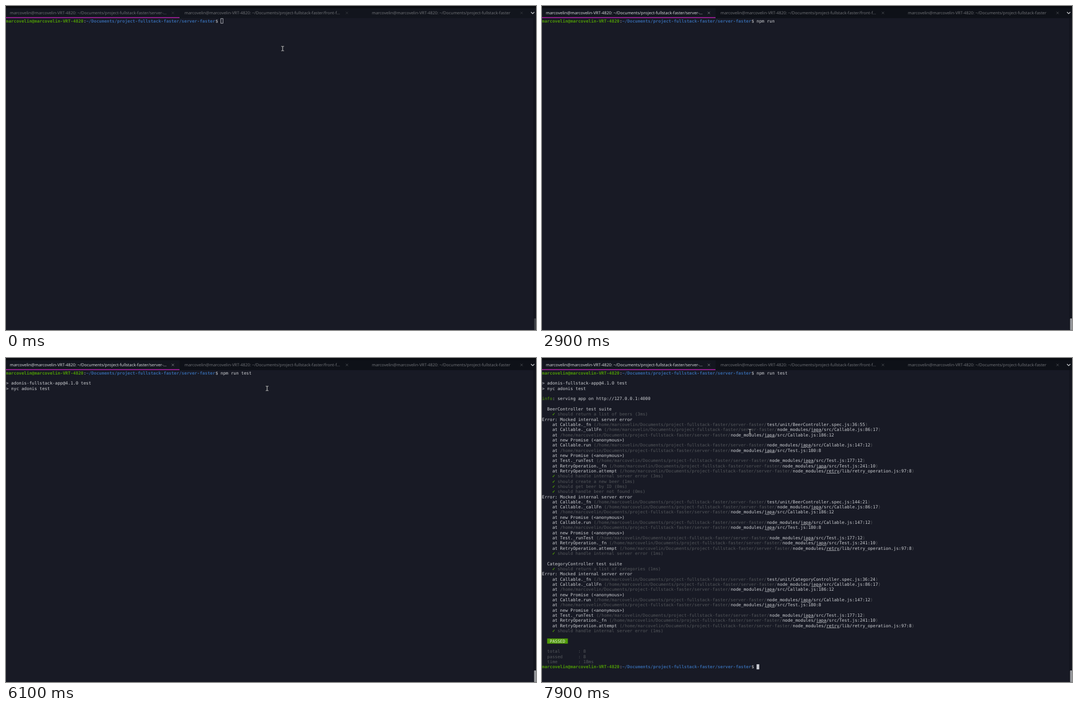
An HTML page for the animation above (8 s loop, 956 px wide and 586 px high).

```html
<!DOCTYPE html>
<html lang="en">
<head>
<meta charset="utf-8">
<title>Terminal test run</title>
<style>
  html, body { margin: 0; width: 100%; height: 100%; overflow: hidden; background: #181a25; }
  svg { display: block; width: 956px; height: 586px; }
  text { white-space: pre; text-rendering: geometricPrecision; }
  #term text { font: 7.745px "DejaVu Sans Mono", monospace; fill: #cdcfd3; }
  #term .dim { fill: #55585c; }
  #term .ok { fill: #4e9a06; }
  #term .mark { fill: #4e9a06; stroke: #4e9a06; stroke-width: .35; }
  #term .user { fill: #4e9a06; font-weight: bold; }
  #term .path { fill: #3465a4; font-weight: bold; }
  #term .link { text-decoration: underline; }
  #term .badge { fill: #e4e6e0; }
  #bar { fill: #12151d; }
  #tabs text { font: 7.43px "Noto Sans", "Open Sans", sans-serif; fill: #6d6f74; }
  #tabs path { fill: none; stroke: #3c3f45; stroke-width: .8; }
  #tabs .chevron { stroke: #d0d2d6; stroke-width: 1.2; }
  #thumb { fill: #3f4248; }
  .focus #bar { fill: #0e1118; }
  .focus #tabs text.active { fill: #d6d8db; }
  .focus #tabs .cross { stroke: #55585e; }
  .focus #tabs .cross.active { stroke: #8b8d92; }
  .focus #thumb { fill: #97999d; }
  #cursor { fill: none; stroke: #c6c8cf; stroke-width: .8; }
  .focus #cursor { fill: #c6c8cf; stroke: none; }
  #pointer { fill: none; }
  #pointer .edge { stroke: #0b0c10; stroke-width: 2.2; }
  #pointer .beam { stroke: #e2e3e6; }
</style>
</head>
<body>
<svg id="stage" viewBox="0 0 956 586">
  <rect width="956" height="586" fill="#181a25"/>
  <rect id="bar" width="956" height="22"/>
  <rect y="4" width="313" height="18" fill="#13161f"/>
  <rect width="956" height="4" fill="#0a0c11"/>
  <rect y="20" width="313" height="2" fill="#8c1d88"/>
  <rect x="951" y="22" width="5" height="564" fill="#13151e"/>
  <rect id="thumb" x="952.5" y="565" width="3.5" height="21" rx="1"/>
  <g id="tabs"><path class="chevron" d="M947 11l3 3l3-3"/></g>
  <g id="term">
    <g id="base"></g>
    <g id="intro"></g>
    <g id="report"></g>
    <g id="done"></g>
    <rect id="cursor"/>
  </g>
  <g id="pointer">
    <path id="beam" class="edge" d="M-2.4-4H-.8L0-3.4L.8-4H2.4M0-3.4V3.4M-2.4 4H-.8L0 3.4L.8 4H2.4"/>
  </g>
</svg>
<script>
const LOOP = 8000, STEP = 100, CW = 4.663, RH = 9.325, TOP = 22.4;
const USER = 'marcovelin', HOST = USER + '-VRT-4820';
const PROJECT = '/Documents/project-fullstack-faster';
const ROOT = '/home/' + USER + PROJECT + '/server-faster/';
const PROMPT_COLS = 83, LAST_ROW = 57;
const FOCUS = 300, ENTER = 5200, INTRO = 5600, REPORT = 7100, DONE = 7400;
const $ = id => document.getElementById(id);

function add(parent, tag, attrs, text) {
  const el = document.createElementNS('http://www.w3.org/2000/svg', tag);
  for (const k in attrs) el.setAttribute(k, attrs[k]);
  if (text !== undefined) el.textContent = text;
  return parent.appendChild(el);
}

// Each run is a string, or [string, class].
function line(parent, row, col, ...runs) {
  let el;
  for (const run of runs) {
    const [text, cls = ''] = [].concat(run);
    el = add(parent, 'text', { x: col * CW, y: TOP + row * RH + 7.3, class: cls }, text);
    col += text.length;
  }
  return el;
}

function prompt(parent, row) {
  line(parent, row, 0, [USER + '@' + HOST, 'user'], ':',
    ['~' + PROJECT + '/server-faster', 'path'], '$');
}

// The report is written top to bottom; row is the next free line.
const report = $('report');
let row = 5;
const write = (col, ...runs) => line(report, row++, col, ...runs);

function check(text) {
  line(report, row, 4, ['✓', 'mark']);
  write(6, [text, 'dim']);
}

function failure(spec) {
  const lib = (name, file) => ['node_modules/', [name, 'link'], file];
  const japa = file => lib('japa', '/src/' + file);
  const call = (fn, where) => write(4, 'at ' + fn + ' ', ['(' + ROOT, 'dim'], ...where, [')', 'dim']);
  const bare = where => {
    write(4, 'at ', [ROOT, 'dim'], ...where);
    write(4, 'at new Promise (<anonymous>)');
  };

  write(0, 'Error: Mocked internal server error');
  call('Callable._fn', ['test/unit/' + spec]);
  call('Callable._callFn', japa('Callable.js:86:17'));
  bare(japa('Callable.js:186:12'));
  call('Callable.run', japa('Callable.js:147:12'));
  bare(japa('Test.js:180:8'));
  call('Test._runTest', japa('Test.js:177:12'));
  call('RetryOperation._fn', japa('Test.js:241:10'));
  call('RetryOperation.attempt', lib('retry', '/lib/retry_operation.js:97:8'));
}

function tab(x, crossX, tail, cls) {
  add($('tabs'), 'text', { x, y: 15, class: cls }, USER + '@' + HOST + ': ~' + PROJECT + tail);
  add($('tabs'), 'path', { d: `M${crossX - 2} 10.5l4 4m0-4l-4 4`, class: 'cross ' + cls });
}

tab(7, 301, '/server-...', 'active');
tab(322, 615, '/front-f...', '');
tab(660, 930, '', '');

prompt($('base'), 0);
const typed = line($('base'), 0, PROMPT_COLS, '');

line($('intro'), 2, 0, '> adonis-fullstack-app@4.1.0 test');
line($('intro'), 3, 0, '> nyc adonis test');

write(0, ['info', 'ok'], ': serving app on http://127.0.0.1:4000');
row++;
write(2, 'BeerController test suite');
check('should return a list of beers (3ms)');
failure('BeerController.spec.js:36:55');
check('should handle internal server error (3ms)');
check('should create a new beer (1ms)');
check('should get beer by ID (0ms)');
check('should handle beer not found (0ms)');
failure('BeerController.spec.js:144:21');
check('should handle internal server error (1ms)');
row++;
write(2, 'CategoryController test suite');
check('should return a list of categories (1ms)');
failure('CategoryController.spec.js:36:24');
check('should handle internal server error (1ms)');
row++;
add(report, 'rect', { x: 2 * CW, y: TOP + row * RH, width: 8 * CW, height: RH, fill: '#4e9a06' });
write(3, ['PASSED', 'badge']);
row++;
write(2, ['total       : 8', 'dim']);
write(2, ['passed      : 8', 'dim']);
write(2, ['time        : 18ms', 'dim']);

prompt($('done'), LAST_ROW);

const beam = $('beam').cloneNode();
beam.removeAttribute('id');
beam.setAttribute('class', 'beam');
$('pointer').append(beam);

// Bursts of typing: start, time between keys, text.
const keys = [[1400, 100, 'npm '], [1820, 80, 'run '], [3820, 80, 'te'], [4300, 100, 'st']]
  .flatMap(([start, gap, text]) => [...text].map((char, i) => ({ char, time: start + i * gap })));

// Each of these moments lights the cursor again and restarts its blinking.
const BLINK = 600;
const wakes = [0, 600, 2300, ENTER, ...keys.map(k => k.time)];
const lit = t => Math.floor((t - Math.max(...wakes.filter(w => w <= t))) / BLINK) % 2 === 0;

// Key points of the pointer: time, x, y.
const PATH = [[100, 499, 77], [500, 471, 55], [6100, 471, 55], [6200, 385, 114],
  [6400, 270, 5], [6500, 270, 5], [6900, 230, 101], [7000, 230, 101], [7900, 375, 133]];

function pointerAt(t) {
  const next = PATH.findIndex(p => p[0] > t);
  if (next < 1) return PATH.at(next).slice(1);
  const [t0, x0, y0] = PATH[next - 1], [t1, x1, y1] = PATH[next];
  const e = 1 - Math.pow(1 - (t - t0) / (t1 - t0), 1.4);
  return [x0 + (x1 - x0) * e, y0 + (y1 - y0) * e];
}

const show = (id, on) => $(id).style.visibility = on ? 'visible' : 'hidden';

function cursorCell(t, count) {
  if (t >= DONE) return [PROMPT_COLS, LAST_ROW];
  if (t >= INTRO) return [0, 5];
  return t >= ENTER ? [0, 1] : [PROMPT_COLS + count, 0];
}

function render(t) {
  const focus = t >= FOCUS;
  $('stage').setAttribute('class', focus ? 'focus' : '');

  const text = keys.filter(k => k.time <= t).map(k => k.char).join('');
  typed.textContent = text;
  show('intro', t >= INTRO);
  show('report', t >= REPORT);
  show('done', t >= DONE);

  const [col, line] = cursorCell(t, text.length);
  const inset = focus ? 0 : .4;
  const box = { x: col * CW + inset, y: TOP + line * RH + inset,
    width: CW + .2 - 2 * inset, height: 9.2 - 2 * inset };
  for (const k in box) $('cursor').setAttribute(k, box[k]);
  show('cursor', lit(t));

  // Typing hides the pointer until it is moved again.
  show('pointer', t < keys[0].time || t >= 6100);
  $('pointer').setAttribute('transform', `translate(${pointerAt(t)})`);
}

const start = performance.now();
function tick() {
  const t = (performance.now() - start) % LOOP;
  render(Math.floor(t / STEP) * STEP);
  requestAnimationFrame(tick);
}
tick();
</script>
</body>
</html>
```
